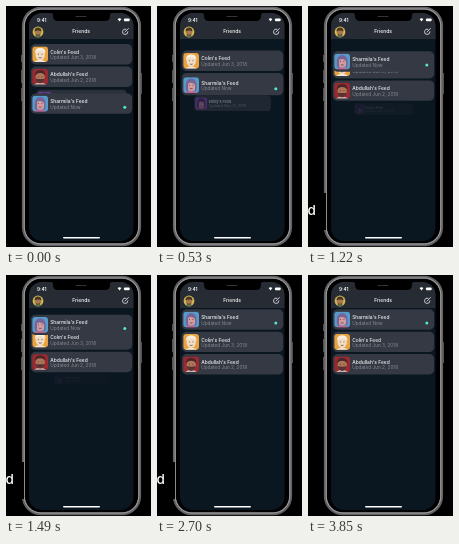
Recreate the animation shown at these times as an HTML page. Size 145 by 241 pixels, loop 3950 ms.

```html
<!DOCTYPE html>
<html lang="en">
<head>
<meta charset="utf-8">
<title>Friends feed reorder</title>
<style>
  html, body { margin: 0; width: 100%; height: 100%; overflow: hidden; background: #000; }
  svg { display: block; width: 145px; height: 241px; }
  text { font-family: Inter, "Open Sans", sans-serif; fill: #fff; }
  .name { font-size: 4.9px; font-weight: 500; fill: #f0f1f3; }
  .date { font-size: 4.7px; fill: #858a93; }
  .side { font-size: 13.5px; font-weight: 500; }
</style>
</head>
<body>
<svg viewBox="0 0 145 241">
  <defs>
    <clipPath id="screen"><rect x="23" y="7" width="104.5" height="228" rx="13"/></clipPath>
    <clipPath id="tile"><rect x="26.4" y="-7.8" width="15.6" height="15.6" rx="3"/></clipPath>
    <clipPath id="round"><circle cx="32" cy="26" r="5.4"/></clipPath>
  </defs>

  <rect width="145" height="241"/>
  <path d="M15.6 49v7M15.6 64v13M15.6 82v13M135.4 67v21" stroke="#5a5a5d" stroke-width="1"/>
  <rect x="17.4" y="2.2" width="116.2" height="236.6" rx="17.500" stroke="#626265" stroke-width="3"/>
  <rect x="18.2" y="3" width="114.6" height="235" rx="16.700" fill="none" stroke="#a2a2a5" stroke-width="1"/>

  <g clip-path="url(#screen)">
    <rect x="23" y="7" width="105" height="228" fill="#0a1620"/>
    <rect x="23" y="7" width="105" height="26" fill="#272b34"/>
    <g id="list"></g>
    <path d="M45 7H106q-2 0-2 2v1q0 5-5 5H52q-5 0-5-5V9q0-2-2-2Z"/>
    <path d="M70 10.500h10" stroke="#34343a" stroke-linecap="round"/>
    <text x="31" y="15.8" font-size="4.7" font-weight="600">9:41</text>
    <path d="M111.6 13q1.9-1.5 3.8 0l-1.9 2.4Z" fill="#fff"/>
    <rect x="118" y="12.5" width="5.6" height="2.8" rx=".8" fill="#fff"/>
    <text x="75.1" y="27.4" font-size="5" font-weight="500" text-anchor="middle">Friends</text>

    <g clip-path="url(#round)">
      <rect x="26" y="20" width="12" height="12" fill="#d0b851"/>
      <path d="M26 32q6-6 12 0Z" fill="#4f7350"/>
      <ellipse cx="32" cy="26.3" rx="3.1" ry="3.5" fill="#a97850"/>
      <path d="M28.5 25.5q0-4 3.5-4t3.500 4q-3.500-2-7 0Z" fill="#493625"/>
      <path d="M30 28q2 1.7 4 0v1.5h-4Z" fill="#493625"/>
    </g>

    <g fill="none" stroke="#f2f3f4" stroke-width=".75" stroke-linecap="round">
      <path d="M120 23.2a2.7 2.7 0 1 0 1.9 2.6"/>
      <path d="M119 26l3.4-3.5"/>
    </g>
    <rect x="57" y="231" width="37" height="1.6" rx=".8" fill="#fff"/>
  </g>
  <g id="side">
    <rect y="187" width="18" height="37"/>
    <text class="side" x="-.5" y="208.6">d</text>
  </g>
</svg>

<script>
const LOOP = 3950, STEP = 87.5;
const TOP = 44.5, PITCH = 22.4;

const face = (skin, hair, shirt) => `
  <path d="M27 8.500q7-6 14 0Z" fill="${shirt}"/>
  <g transform="translate(34.2 0) scale(1.2) translate(-34.5 0)">
    <ellipse cx="34.5" cy=".3" rx="3.9" ry="4.7" fill="${skin}"/>
    ${hair}
    <path d="M32.6 0h.9M35.5 0h.9M33.3 2.7q1.2.7 2.4 0" fill="none" stroke="#4a2d2b" stroke-width=".55"/>
  </g>`;
const cap = color => `<path d="M30.200-.5q-.4-5 4.300-5t4.300 5q-1.300-2.500-4.300-2.500t-4.300 2.500Z" fill="${color}"/>`;
const beard = color => `<path d="M30.800 1.500q3.700 1 7.400 0-.4 4-3.700 4t-3.700-4Z" fill="${color}"/>`;
const mane = color => `<path d="M30 4q-1-9.500 4.500-9.500T39 4l-1.300 2V-.5q-2.600-2.500-5.800-1V6Z" fill="${color}"/>`;

// Later cards are painted above earlier ones.
const people = [
  { name: "Emily", date: "Updated May 31, 2018", from: 2, bg: "#8043b4",
    art: face("#b27c95", mane("#4a2a60"), "#a84e86") },
  { name: "Colin", date: "Updated Jun 3, 2018", from: 0, to: 1, bg: "#e8a23e",
    art: face("#f1ddc6", cap("#f5eee2"), "#f0e6d6") },
  { name: "Abdullah", date: "Updated Jun 2, 2018", from: 1, to: 2, bg: "#9c2830",
    art: face("#ad7658", cap("#4a262a") + beard("#5a3533"), "#c9b3ac") },
  { name: "Sharmila", date: "Updated Now", from: 3, to: 0, bg: "#559bcb", fresh: true,
    art: face("#d39da0", mane("#77659a"), "#c4658f") }
];

const list = document.getElementById("list");
const side = document.getElementById("side");

list.innerHTML = people.map(p => `
  <g>
    <rect x="24.8" y="-10.2" width="101.4" height="20.4" rx="4.8" fill="#343943"/>
    <g clip-path="url(#tile)">
      <rect x="26" y="-8" width="16" height="16" fill="${p.bg}"/>${p.art}
    </g>
    <text class="name" x="44.2" y="-.4">${p.name}'s Feed</text>
    <text class="date" x="44.2" y="5.2">${p.date}</text>
    ${p.fresh ? '<circle cx="118.8" cy="3.6" r="1.5" fill="#55e6cd"/>' : ""}
  </g>`).join("");
const cards = [...list.children];

// Pairs of time and progress.
const lifted = [[0, .21], [530, .487], [790, .64], [1220, .835], [1550, .94], [1840, .987], [2190, 1]];
const pushed = [[0, .17], [530, .46], [790, .6], [1220, .79], [1550, .92], [1840, .98], [2190, 1]];
const fade = [[612, 0], [700, .7], [787, 1], [2975, 1], [3325, 0]];

function at(track, t) {
  if (t <= track[0][0]) return track[0][1];
  const i = track.findIndex(k => k[0] >= t);
  if (i < 0) return track[track.length - 1][1];
  const [t0, v0] = track[i - 1], [t1, v1] = track[i];
  return v0 + (v1 - v0) * (t - t0) / (t1 - t0);
}

function draw(now) {
  const t = Math.floor((now % LOOP + 12) / STEP) * STEP;
  const rise = at(lifted, t), push = at(pushed, t);
  people.forEach((p, i) => {
    const y = TOP + p.from * PITCH;
    if (p.to === undefined) {
      const s = 1 - rise / 2;
      cards[i].setAttribute("transform",
        `translate(${75.5 * (1 - s)} ${y + 16.5 * rise}) scale(${s})`);
      cards[i].setAttribute("opacity", 1 - rise);
    } else {
      const k = p.fresh ? rise : push;
      cards[i].setAttribute("transform", `translate(0 ${y + (p.to - p.from) * PITCH * k})`);
    }
  });
  side.setAttribute("opacity", at(fade, t));
}

const start = performance.now();
function tick() {
  draw(performance.now() - start);
  requestAnimationFrame(tick);
}
tick();
</script>
</body>
</html>
```
